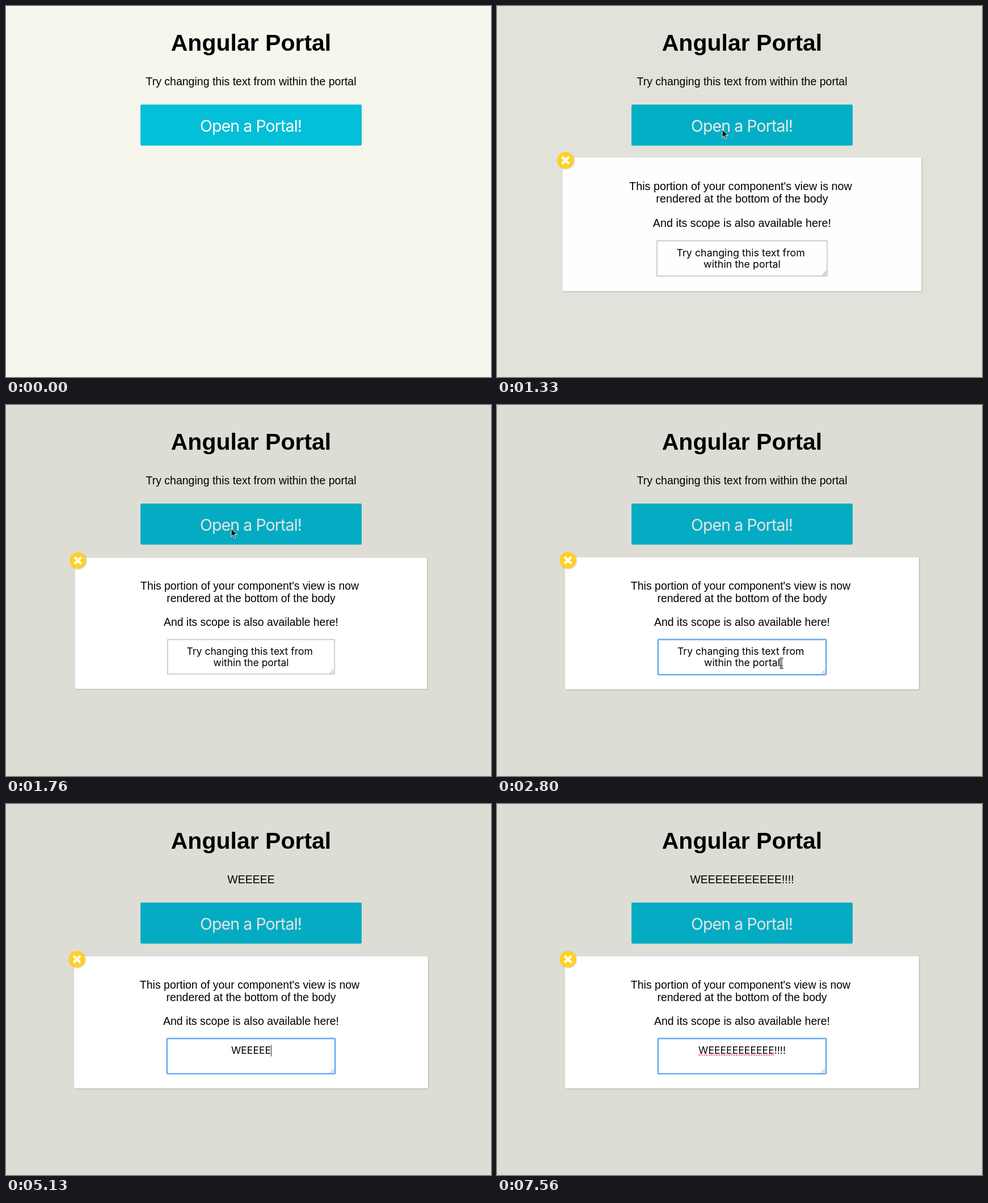
These frames come from a looping animation (855 px wide and 655 px high, 8000 ms). An HTML page:

```html
<!DOCTYPE html>
<html lang="en">
<head>
<meta charset="utf-8">
<title>Angular Portal</title>
<style>
  html, body { margin: 0; width: 100%; height: 100%; overflow: hidden; background: #f7f6ed; }
  svg { display: block; width: 855px; height: 655px; }
  text { font: 19.5px "Liberation Sans", Arial, sans-serif; text-anchor: middle; white-space: pre; }
  #title { font-size: 41px; font-weight: bold; }
  #label { font: 28.5px Inter, sans-serif; letter-spacing: -.9px; fill: #fff; }
  #field text { font: 17.6px Inter, sans-serif; }
  #sheet, #close { filter: drop-shadow(1px 1.5px 1px rgba(0, 0, 0, .2)); }
  #focus { filter: drop-shadow(0 0 1px #6fb0f5); }
</style>
</head>
<body>
<svg viewBox="0 0 855 655">
  <rect width="855" height="655" fill="#f7f6ed"/>
  <text id="title" x="432" y="79">Angular Portal</text>
  <text id="echo" x="432" y="140"></text>
  <rect x="237" y="174" width="390" height="72.5" rx="2" fill="#03bfd8"/>
  <text id="label" x="431.5" y="222">Open a Portal!</text>
  <rect id="shade" width="855" height="655"/>

  <g id="portal">
    <rect id="sheet" x="120" y="269" width="624" height="233" rx="2" fill="#fff"/>
    <g id="close">
      <circle cx="125" cy="274" r="14.5" fill="#ffd120"/>
      <path d="M120.5 269.5l9 9m0-9l-9 9" stroke="#fff" stroke-width="4.2" stroke-linecap="square"/>
    </g>
    <text x="429.5" y="326">This portion of your component's view is now</text>
    <text x="432" y="348">rendered at the bottom of the body</text>
    <text x="432" y="390">And its scope is also available here!</text>
    <g id="field">
      <rect x="284" y="414.3" width="296" height="61.2" fill="#fff" stroke="#a0a2ac"/>
      <rect id="focus" x="284" y="414.3" width="296" height="61.7" rx="1" fill="#fff" stroke="#5fa5f3" stroke-width="2"/>
      <path d="M571.5 474.5l7-7m-3 7l3-3" stroke="#888" fill="none"/>
      <g fill="#b4d5fe">
        <rect id="sel1" y="425" height="20.5"/>
        <rect id="sel2" y="445" height="21"/>
      </g>
      <text id="line1" y="441"></text>
      <text id="line2" x="432" y="461"></text>
      <path id="squiggle" stroke="#f0405a" stroke-width="1.6" stroke-dasharray="3 1.4"/>
      <path id="caret" stroke="#222"/>
    </g>
  </g>

  <path id="arrow" d="M0 0V14.5L3.3 11.4L5.6 16.8L8 15.8L5.7 10.5H10.3Z" fill="#111" stroke="#fff"/>
  <path id="beam" d="M-3-9.5Q0-9.5 0-7V7Q0 9.5-3 9.5M3-9.5Q0-9.5 0-7M0 7Q0 9.5 3 9.5M-2 4H2" fill="none" stroke="#333" stroke-width="1.2"/>
</svg>
<script>
const LOOP = 8000, OPEN = 1045, FOCUS = 2730, DRAG = 2830, RELEASE = 3060;
const PROMPT = ["Try changing this text from", "within the portal"];
const TYPED = "W" + "E".repeat(11) + "!!!!";
const KEYS = [4030, 4560, 4700, 4830, 4960, 5130, 5360, 5560, 5730, 5900, 6060, 6230, 6600, 6760, 6900, 7060];
// time, x, y of the pointer on each leg
const PATH = [
  [330, 463, 600], [620, 391, 224], [730, 397, 218],
  [2160, 397, 218], [2560, 502, 456],
  [DRAG, 502, 456], [3030, 300, 383], [3090, 290, 387], [3340, 150, 672]
];

const el = {};
for (const node of document.querySelectorAll("[id]")) el[node.id] = node;
const clamp = (v, lo = 0, hi = 1) => Math.min(hi, Math.max(lo, v));
const mix = (a, b, u) => a + (b - a) * u;
const show = (node, on) => node.setAttribute("visibility", on ? "visible" : "hidden");
const setText = (node, s) => { if (node.textContent !== s) node.textContent = s; };

// CSS "ease": cubic-bezier(.25, .1, .25, 1)
function ease(x) {
  const curve = (a, b, s) => 3 * a * s * (1 - s) ** 2 + 3 * b * s * s * (1 - s) + s ** 3;
  let lo = 0, hi = 1;
  for (let i = 0; i < 20; i++) {
    const mid = (lo + hi) / 2;
    if (curve(.25, .25, mid) < x) lo = mid; else hi = mid;
  }
  return curve(.1, 1, lo);
}

function bounce(u) {
  if (u < .5) return mix(.3, 1.05, ease(u / .5));
  if (u < .7) return mix(1.05, .9, ease((u - .5) / .2));
  return mix(.9, 1, ease((u - .7) / .3));
}

function pointerAt(t) {
  const i = PATH.findIndex(p => p[0] > t);
  if (i < 0) return PATH.at(-1).slice(1);
  const [t0, x0, y0] = PATH[i - 1], [t1, x1, y1] = PATH[i];
  const s = (t - t0) / (t1 - t0);
  const u = i === 1 ? 1 - (1 - s) ** 2 : s * s * (3 - 2 * s);
  return [mix(x0, x1, u), mix(y0, y1, u)];
}

function drawPointer(t) {
  const seen = t >= PATH[0][0] && t < PATH.at(-1)[0];
  const [x, y] = seen ? pointerAt(t) : [0, 0];
  const overText = t > 2160 && y > 305 && y < 476 && x > 236 && x < 623;
  show(el.arrow, seen && !overText);
  show(el.beam, seen && overText);
  for (const node of [el.arrow, el.beam]) node.setAttribute("transform", `translate(${x} ${y})`);
}

function select(node, from, to) {
  node.setAttribute("x", from);
  node.setAttribute("width", Math.max(0, to - from));
}

function drawField(t) {
  const count = KEYS.filter(k => k <= t).length;
  const word = TYPED.slice(0, count);
  setText(el.echo, word || PROMPT.join(" "));
  setText(el.line1, word || PROMPT[0]);
  setText(el.line2, word ? "" : PROMPT[1]);
  el.line1.setAttribute("x", word ? 432 : 429.7);
  show(el.focus, t >= FOCUS);

  const selecting = t > DRAG && !count;
  const [x, y] = t < RELEASE ? pointerAt(Math.max(t, DRAG)) : [0, 0];
  select(el.sel1, !selecting || y > 445 ? 543 : y > 425 ? clamp(x, 317, 543) : 317, 543);
  select(el.sel2, !selecting ? 500 : y > 445 ? clamp(x, 364, 500) : 364, 500);

  const lastInput = count ? KEYS[count - 1] : FOCUS;
  const line = word ? el.line1 : el.line2;
  const half = line.getComputedTextLength() / 2;
  show(el.caret, t >= FOCUS && !selecting && t - lastInput < 500);
  el.caret.setAttribute("d", `M${Math.round(432 + half) + .5} ${word ? 425.5 : 445.5}v20`);

  const misspelt = t >= 6630;
  show(el.squiggle, misspelt);
  if (misspelt) el.squiggle.setAttribute("d", `M${432 - half} 443.3h${line.getSubStringLength(0, 12)}`);
}

function draw() {
  const t = performance.now() % LOOP;
  const u = clamp((t - OPEN) / 787);
  el.shade.setAttribute("opacity", .1 * ease(clamp((t - 1030) / 600)));
  el.portal.setAttribute("opacity", u ? ease(clamp(u / .4)) : 0);
  el.portal.setAttribute("transform", `translate(432 385.5) scale(${bounce(u)}) translate(-432 -385.5)`);
  drawField(t);
  drawPointer(t);
  requestAnimationFrame(draw);
}
draw();
</script>
</body>
</html>
```
